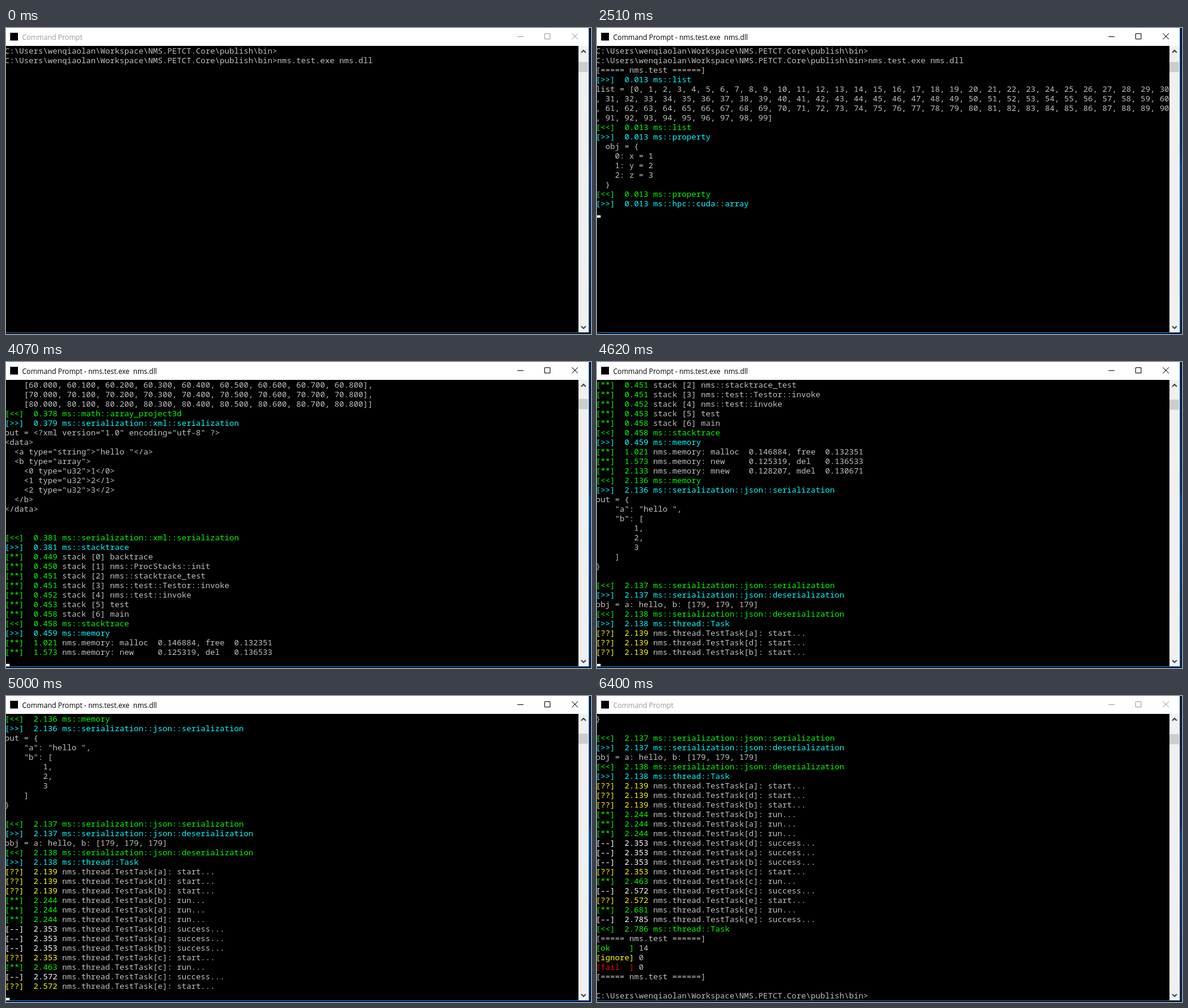
An HTML page that plays this animation: 979 by 513 pixels, repeating every 6480 ms.

```html
<!DOCTYPE html>
<html lang="en">
<head>
<meta charset="utf-8">
<title>Command Prompt</title>
<style>
  html, body { margin: 0; width: 100%; height: 100%; overflow: hidden; background: #04173a; }
  #stage { position: relative; width: 979px; height: 513px; overflow: hidden; }
  svg, #title, #screen, #cursor { position: absolute; }
  svg { left: 0; top: 0; }
  #title { left: 27px; top: 7px; font: 11.7px/16px "Open Sans", "Noto Sans", sans-serif; white-space: pre; }
  #screen {
    left: 0; top: 30px; width: 958px; height: 480px; overflow: hidden; background: #000; color: #c0c0c0;
    font: 13.3333px/16px "Noto Sans Mono", "Liberation Mono", monospace;
  }
  #screen div { height: 16px; margin-left: -2px; white-space: pre; }
  #cursor { width: 8px; height: 4px; background: #fff; clip-path: inset(0); }
  #stage { --ink: #999; --edge: #3b5675; }
  #stage.active { --ink: #000; --edge: #1779c8; }
  #title { color: var(--ink); }
  #buttons { stroke: var(--ink); fill: none; }
  #edge { fill: var(--edge); }
</style>
</head>
<body>
<div id="stage">
  <svg width="979" height="513">
    <defs>
      <linearGradient id="desk" x2="0" y2="1">
        <stop offset="0" stop-color="#05183a"/>
        <stop offset=".42" stop-color="#07285a"/>
        <stop offset=".45" stop-color="#0a3f7c"/>
        <stop offset="1" stop-color="#04204a"/>
      </linearGradient>
    </defs>
    <rect x="976" width="3" height="511" fill="url(#desk)"/>
    <path id="edge" d="M975 0h1v511H0v-1h975z"/>
    <rect width="975" height="30" fill="#fff"/>
    <rect x="7" y="8" width="13" height="13" fill="#000"/>
    <g id="buttons">
      <path d="M856 14.5h10M901.5 9.5h9v9h-9z"/>
      <path d="M947 9l10 10M957 9l-10 10"/>
    </g>
    <rect x="958" y="30" width="17" height="480" fill="#f0f0f0"/>
    <rect id="thumb" x="958" width="16" height="17" fill="#cdcdcd"/>
    <path d="M962.8 41.2l3.7-3.7 3.7 3.7M962.8 500l3.7 3.7 3.7-3.7" fill="none" stroke="#404040" stroke-width="2"/>
  </svg>
  <div id="title"></div>
  <div id="screen"></div>
  <div id="cursor"></div>
</div>
<script>
const LOOP = 6480, COLUMNS = 120, ROWS = 30, CELL_W = 8, CELL_H = 16;
const prompt = String.raw`C:\Users\wenqiaolan\Workspace\NMS.PETCT.Core\publish\bin>`;
const range = n => [...Array(n).keys()];
const task = (mark, time, id, state) => `[${mark}]  ${time} nms.thread.TestTask[${id}]: ${state}...\n`;

const matrix = range(9).map(row => {
  const cells = range(9).map(col => (row * 10 + col / 10).toFixed(3)).join(", ");
  return (row ? "    [" : "   [[") + cells + (row < 8 ? "],\n" : "]]\n");
}).join("");

// Text appended to the console at each time.
const output = [
  [0, `${prompt}\n${prompt}nms.test.exe nms.dll`],
  [2440, "\n"],
  [2510, `[===== nms.test ======]
[>>]  0.013 ms::list
list = [${range(100).join(", ")}]
[<<]  0.013 ms::list
[>>]  0.013 ms::property
  obj = {
    0: x = 1
    1: y = 2
    2: z = 3
  }
[<<]  0.013 ms::property
[>>]  0.013 ms::hpc::cuda::array
`],
  [2830, `[<<]  0.377 ms::hpc::cuda::array
[>>]  0.377 ms::math::array_project3d
${matrix}${matrix}[<<]  0.378 ms::math::array_project3d
[>>]  0.379 ms::serialization::xml::serialization
out = <?xml version="1.0" encoding="utf-8" ?>
<data>
  <a type="string">"hello "</a>
  <b type="array">
    <0 type="u32">1</0>
    <1 type="u32">2</1>
    <2 type="u32">3</2>
  </b>
</data>


[<<]  0.381 ms::serialization::xml::serialization
[>>]  0.381 ms::stacktrace
`],
  [2930, `[**]  0.449 stack [0] backtrace
[**]  0.450 stack [1] nms::ProcStacks::init
[**]  0.451 stack [2] nms::stacktrace_test
[**]  0.451 stack [3] nms::test::Testor::invoke
[**]  0.452 stack [4] nms::test::invoke
[**]  0.453 stack [5] test
[**]  0.458 stack [6] main
[<<]  0.458 ms::stacktrace
[>>]  0.459 ms::memory
`],
  [3460, "[**]  1.021 nms.memory: malloc  0.146884, free  0.132351\n"],
  [4070, "[**]  1.573 nms.memory: new     0.125319, del   0.136533\n"],
  [4620, `[**]  2.133 nms.memory: mnew    0.128207, mdel  0.130671
[<<]  2.136 ms::memory
[>>]  2.136 ms::serialization::json::serialization
out = {
    "a": "hello ",
    "b": [
        1,
        2,
        3
    ]
}

[<<]  2.137 ms::serialization::json::serialization
[>>]  2.137 ms::serialization::json::deserialization
obj = a: hello, b: [179, 179, 179]
[<<]  2.138 ms::serialization::json::deserialization
[>>]  2.138 ms::thread::Task
` + ["a", "d", "b"].map(id => task("??", "2.139", id, "start")).join("")],
  [4680, task("**", "2.244", "b", "run")],
  [4740, task("**", "2.244", "a", "run") + task("**", "2.244", "d", "run")],
  [4840, ["d", "a", "b"].map(id => task("--", "2.353", id, "success")).join("")
    + task("??", "2.353", "c", "start")],
  [4920, task("**", "2.463", "c", "run")],
  [5000, task("--", "2.572", "c", "success") + task("??", "2.572", "e", "start")],
  [5150, task("**", "2.681", "e", "run")],
  [5260, task("--", "2.785", "e", "success")],
  [5390, `[<<]  2.786 ms::thread::Task
[===== nms.test ======]
[ok    ] 14
[ignore] 0
[fail  ] 0
[===== nms.test ======]

${prompt}`],
];

const colors = {
  ">>": "#0ff", "<<": "#0f0", "**": "#0f0", "??": "#ff0", "--": "#fff",
  ok: "#0f0", ignore: "#ff0", fail: "#f00",
};
const tagPattern = /^\[(>>|<<|\*\*|\?\?|--|ok|ignore|fail) *\](  \d\.\d+)?/;
const thumbSteps = [[0, 57], [2830, 62], [4620, 63], [5390, 64]];
const cursorOff = [[1840, 2370], [3990, 4070], [6000, 6400]];

const [stage, title, screen, cursor, thumb] =
  ["stage", "title", "screen", "cursor", "thumb"].map(id => document.getElementById(id));
const within = (t, [start, end]) => t >= start && t < end;

function makeRow(line) {
  const row = document.createElement("div");
  const tag = line.match(tagPattern);
  if (!tag) {
    row.textContent = line;
    return row;
  }
  const span = document.createElement("span");
  span.style.color = colors[tag[1]];
  span.textContent = /<<|>>/.test(tag[1]) ? line : tag[0];
  row.append(span, line.slice(span.textContent.length));
  return row;
}

function drawConsole(batchCount) {
  const text = output.slice(0, batchCount).map(batch => batch[1]).join("");
  const lines = text.split("\n").flatMap(line => line.match(new RegExp(`.{1,${COLUMNS}}`, "g")) || [""]);
  const visible = lines.slice(-ROWS);
  screen.replaceChildren(...visible.map(makeRow));
  cursor.style.left = visible.at(-1).length * CELL_W - 2 + "px";
  cursor.style.top = 30 + visible.length * CELL_H - 4 + "px";
}

let drawnBatches = 0;
function render(now) {
  const t = now % LOOP;
  const active = within(t, [1290, 6400]);
  const batchCount = output.filter(([start]) => t >= start).length;
  if (batchCount !== drawnBatches) drawConsole(drawnBatches = batchCount);
  stage.classList.toggle("active", active);
  title.textContent = "Command Prompt" + (within(t, [2440, 5390]) ? " - nms.test.exe  nms.dll" : "");
  cursor.hidden = !active || cursorOff.some(span => within(t, span));
  thumb.setAttribute("y", thumbSteps.findLast(([start]) => t >= start)[1]);
}

const startTime = performance.now();
function tick() {
  render(performance.now() - startTime);
  requestAnimationFrame(tick);
}
tick();
</script>
</body>
</html>
```
